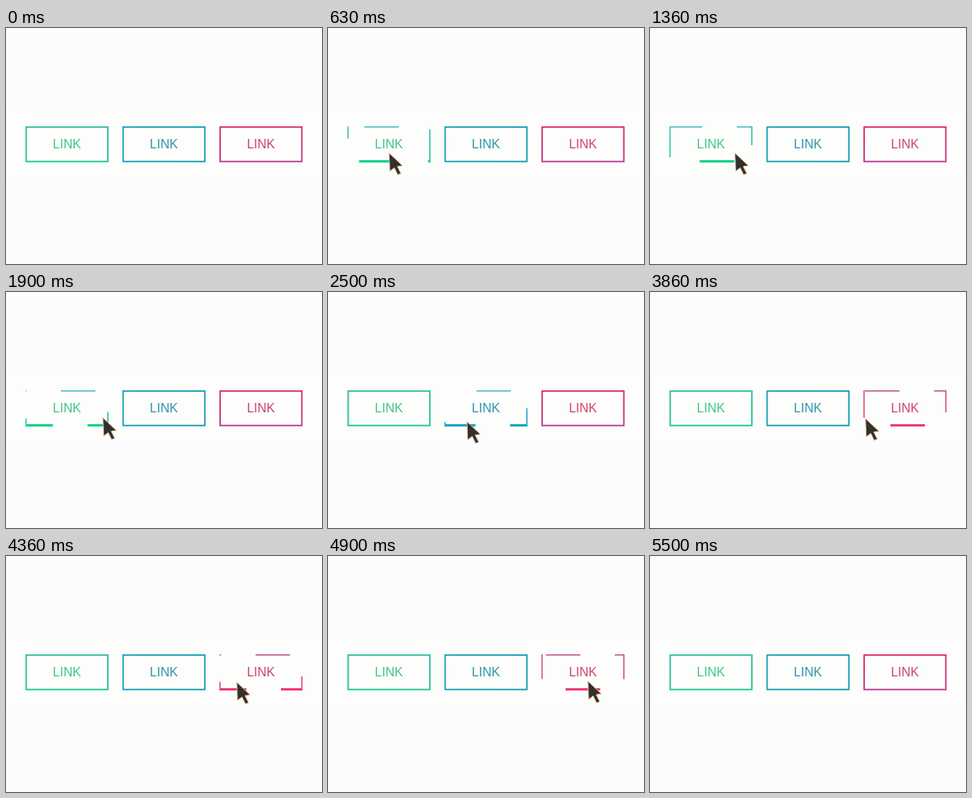
Animation, 400 px wide and 300 px high, one loop 5530 ms. Source, as an HTML page:

```html
<!DOCTYPE html>
<html lang="en">
<head>
<meta charset="utf-8">
<title>Link buttons</title>
<style>
  html, body { margin: 0; width: 100%; height: 100%; overflow: hidden; background: #fcfcfe; }
  svg { display: block; width: 100vw; height: 100vh; }
  text { font: 16px "Liberation Sans", Arial, sans-serif; text-anchor: middle; }
  .rest { fill: none; stroke-width: 1.9; }
  .dash { fill: none; stroke-width: 3; }
</style>
</head>
<body>
<svg id="stage" viewBox="0 0 400 300">
  <defs id="defs">
    <clipPath id="trim"><rect x="0" y="0" width="105.1" height="48"/></clipPath>
  </defs>
  <rect y="104" width="400" height="88" fill="#fdfdfb"/>
  <g id="buttons"></g>
  <path id="cursor" d="M0 0L17 16L10.5 17L15 26L11 27.5L6.7 18.7L1 23Z"
    fill="#33302e" stroke="#e3bd98" stroke-width="1" stroke-linejoin="round"/>
</svg>
<script>
const LOOP = 5530, W = 105, H = 44.6, PERIOD = 87.4;
const NS = "http://www.w3.org/2000/svg";
const $ = id => document.getElementById(id);

// rest / dash: gradient vector and stops; zero: time at which a dash starts in the corner;
// path: [time, x, y] of the pointer
const BUTTONS = [
  { x: 24.6, text: "#40c48e",
    rest: [0, 0, 0, 1, "#38bda4", "#25c795"],
    dash: [0, 0, 0, 1, "#4ab4c8", "#2cc5a0", "#1bcb96", "#06d38c"],
    from: 30, to: 2160, zero: 1386,
    path: [[30, 46, 165], [600, 76, 159], [1360, 107.5, 159], [1900, 122.7, 160]] },
  { x: 147.4, text: "#3095aa",
    rest: [0, 0, 1, 1, "#1fa6b8", "#189db6"],
    dash: [0, 0, 0, 1, "#4fb0c2", "#30a9c0", "#12a5c6"],
    from: 2160, to: 3860, zero: 3038,
    path: [[2160, 152, 166], [3060, 215, 163], [3260, 232, 164], [3630, 254, 166]] },
  { x: 270.2, text: "#ca466f",
    rest: [0, 0, 0, 1, "#d6376b", "#cf3674", "#b83e98"],
    dash: [0, 0, 0, 1, "#b9508c", "#d94679", "#ee3a78"],
    from: 3860, to: 5500, zero: 3838,
    path: [[3860, 272.7, 161], [4360, 292, 160.5], [4960, 333, 159], [5230, 361, 164]] }
];

function add(parent, tag, attrs) {
  const el = document.createElementNS(NS, tag);
  for (const k in attrs) el.setAttribute(k, attrs[k]);
  return parent.appendChild(el);
}

function gradient(id, [x1, y1, x2, y2, ...stops]) {
  const g = add($("defs"), "linearGradient", {
    id, gradientUnits: "userSpaceOnUse", x1: x1 * W, y1: y1 * H, x2: x2 * W, y2: y2 * H
  });
  stops.forEach((c, i) => add(g, "stop", { offset: i / (stops.length - 1), "stop-color": c }));
  return `url(#${id})`;
}

BUTTONS.forEach((b, i) => {
  const g = add($("buttons"), "g", { transform: `translate(${b.x} 125)` });
  b.restEl = add(g, "rect", {
    class: "rest", x: 0.9, y: 0.9, width: W - 1.6, height: H - 0.8,
    stroke: gradient("rest" + i, b.rest)
  });
  const clip = add(g, "g", { "clip-path": "url(#trim)" });
  b.dashEl = add(clip, "rect", {
    class: "dash", width: W, height: H,
    stroke: gradient("dash" + i, b.dash), "stroke-dasharray": PERIOD / 2
  });
  add(g, "text", { x: W / 2, y: 28, fill: b.text }).textContent = "LINK";
});

function pointAt(path, t) {
  const i = Math.max(1, path.findIndex(p => p[0] >= t));
  const [t0, x0, y0] = path[i - 1], [t1, x1, y1] = path[i];
  const k = (t - t0) / (t1 - t0);
  return [x0 + (x1 - x0) * k, y0 + (y1 - y0) * k];
}

const show = (el, on) => el.setAttribute("visibility", on ? "visible" : "hidden");

function draw(t) {
  let active = false;
  for (const b of BUTTONS) {
    const on = t >= b.from && t < b.to;
    show(b.restEl, !on);
    show(b.dashEl, on);
    if (!on) continue;
    active = true;
    const held = Math.min(t, b.path[b.path.length - 1][0]);
    b.dashEl.setAttribute("stroke-dashoffset", -(held - b.zero) / 1000 * PERIOD);
    $("cursor").setAttribute("transform", `translate(${pointAt(b.path, held)})`);
  }
  show($("cursor"), active);
}

const start = performance.now();
function tick() {
  draw((performance.now() - start) % LOOP);
  requestAnimationFrame(tick);
}
tick();
</script>
</body>
</html>
```
